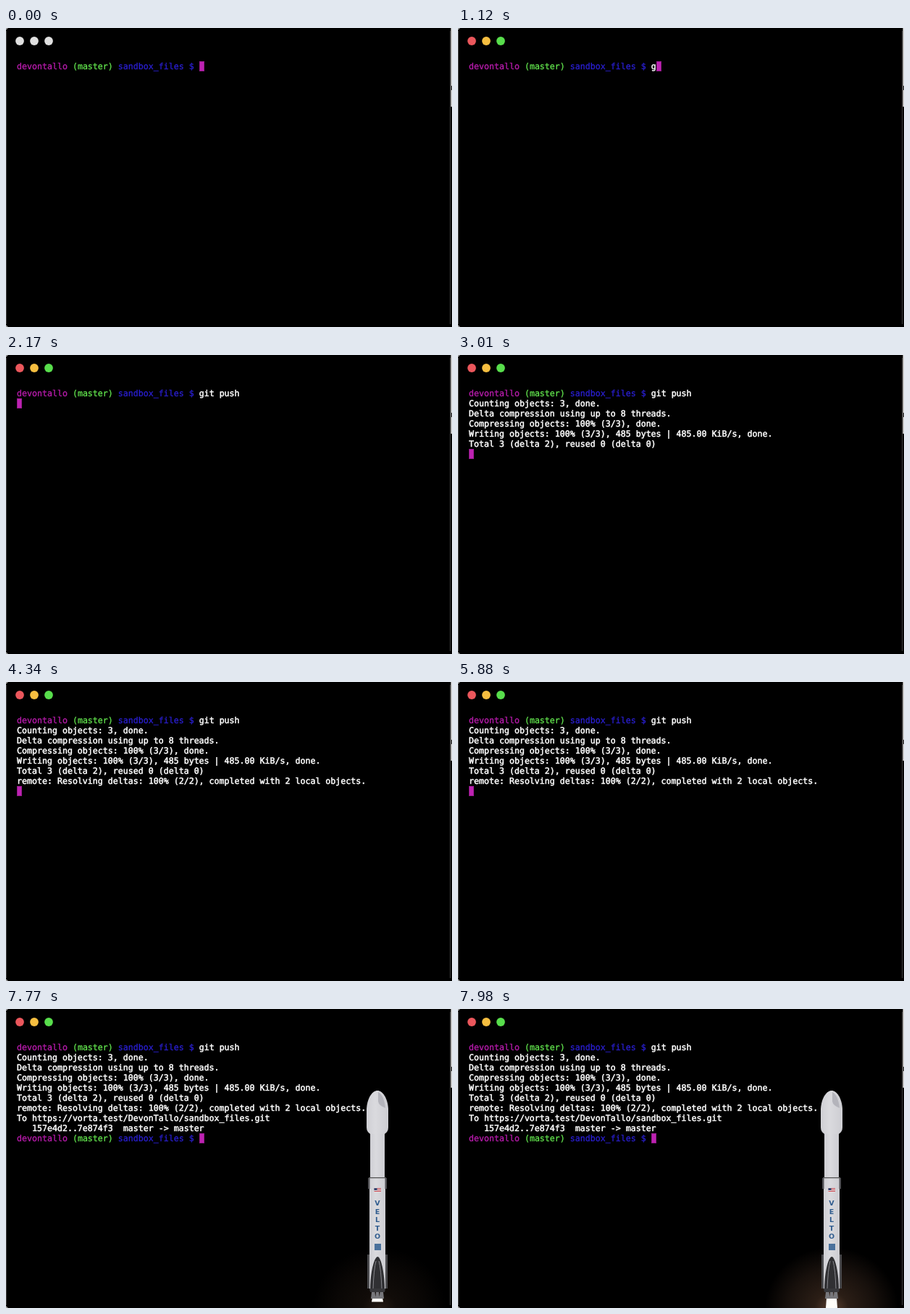
Recreate the animation shown at these times as an HTML page. Size 616 by 414 pixels, loop 8 s.

```html
<!DOCTYPE html>
<html lang="en">
<head>
<meta charset="utf-8">
<title>Terminal push</title>
<style>
  html, body { margin: 0; width: 100%; height: 100%; overflow: hidden; background: #000; }
  svg { display: block; width: 616px; height: 414px; }
  .term text {
    font: 11.627px "DejaVu Sans Mono", monospace;
    white-space: pre;
    text-rendering: geometricPrecision;
    fill: #fff;
    stroke: #fff;
    stroke-width: .5px;
  }
  .term .user { fill: #b51ba9; stroke: #b51ba9; stroke-width: .35px; }
  .term .branch { fill: #5fdd4b; stroke: #5fdd4b; stroke-width: .35px; }
  .term .path { fill: #2a1fd0; stroke: #2a1fd0; stroke-width: .3px; }
  .label text { font: bold 9.5px "DejaVu Sans", sans-serif; text-anchor: middle; fill: #2f5b8e; }
</style>
</head>
<body>
<svg viewBox="0 0 616 414">
  <defs>
    <radialGradient id="glow">
      <stop offset="0" stop-color="#5a4030"/>
      <stop offset=".25" stop-color="#2b1e16"/>
      <stop offset=".65" stop-color="#17100c"/>
      <stop offset="1" stop-color="#000"/>
    </radialGradient>
    <linearGradient id="hull">
      <stop offset="0" stop-color="#cfcfd4"/>
      <stop offset=".4" stop-color="#dadade"/>
      <stop offset="1" stop-color="#cdcdd2"/>
    </linearGradient>
  </defs>

  <rect width="616" height="414"/>
  <path d="M614.500 0h1.500v109h-1.500z" fill="#e4e4e4"/>
  <path d="M615 80h1v6h-1z" fill="#222"/>
  <path d="M0 0h3L0 3zM0 414h3l-3 -3z" fill="#999"/>
  <path d="M.5 4V410M613.500 4V410" stroke="#3c3c3c"/>

  <g id="dots">
    <circle cx="19" cy="18" r="5.900"/>
    <circle cx="39" cy="18" r="5.900"/>
    <circle cx="59" cy="18" r="5.900"/>
  </g>

  <ellipse id="halo" cx="516" cy="414" rx="92" ry="84" fill="url(#glow)"/>
  <g class="term" id="term"></g>
  <rect id="cursor" width="6" height="13" fill="#bd22b2" stroke="#931a8a"/>

  <g id="rocket">
    <path id="flame" fill="#fffdf8"/>
    <path d="M503 172h20v62h-20z" fill="url(#hull)"/>
    <path d="M498 138C499 123 506 113 513 113S527 123 528 138V164Q528 170 523 173H503Q498 170 498 164Z" fill="url(#hull)"/>
    <path d="M514 115Q522 119 524 137Q515 134 514 128Z" fill="#b4b4bb"/>
    <path d="M502 234h22v154h-22z" fill="url(#hull)"/>
    <path d="M501 233h24v1.3h-24z" fill="#555"/>
    <path d="M500 234h2.5v15H500zM523.5 234h2.5v15h-2.5z" fill="#505054"/>

    <path d="M508.500 248h9.500v5.500h-9.500z" fill="#eee"/>
    <path d="M508.500 248.500h9.500M508.500 250.500h9.500M508.500 252.500h9.500" stroke="#c2414b"/>
    <path d="M508.500 248h4v3h-4z" fill="#33446f"/>
    <g class="label" id="label"></g>
    <path d="M509 325h9v9h-9z" fill="#4a719c"/>

    <path d="M499 340h3v47h-3zM524 340h3v47h-3z" fill="#49494c"/>
    <path d="M503 388C503 367 508 344 513 343S523 367 523 388Z" fill="#303033"/>
    <path d="M507 388Q508 360 511 349M519 388Q518 360 515 349" fill="none" stroke="#85858a"/>
    <path d="M502 387h22l-1 5h-20z" fill="#38383b"/>
    <path d="M505 392h4.500l1 9h-6.500zM511 392h4l1 9h-6zM516.500 392h4.500l1 9h-6.500z" fill="#77777b"/>
  </g>
</svg>
<script>
const LOOP = 8000, STEP = 70, LEFT = 15, CELL = 7, ROW = 14;
const user = 'devontallo', repo = 'sandbox_files', host = 'vorta.test', command = 'git push';
const promptLength = user.length + repo.length + 13;
const byId = id => document.getElementById(id);

const prompt = `<tspan class="user">${user}</tspan> <tspan class="branch">(master)</tspan> ` +
  `<tspan class="path">${repo} $</tspan> `;

// [time of appearance, markup] for each terminal row
const rows = [
  [0, prompt + '<tspan id="typed"></tspan>'],
  [2590, 'Counting objects: 3, done.'],
  [2590, 'Delta compression using up to 8 threads.'],
  [2660, 'Compressing objects: 100% (3/3), done.'],
  [2730, 'Writing objects: 100% (3/3), 485 bytes | 485.00 KiB/s, done.'],
  [2800, 'Total 3 (delta 2), reused 0 (delta 0)'],
  [3080, 'remote: Resolving deltas: 100% (2/2), completed with 2 local objects.'],
  [7210, `To https://${host}/DevonTallo/${repo}.git`],
  [7210, '   157e4d2..7e874f3  master -&gt; master'],
  [7350, prompt]
];
const ENTER = 1960, ROCKET = 7210, IGNITION = 7700;

byId('term').innerHTML = rows.map(([, markup], i) =>
  `<text x="${LEFT}" y="${57 + ROW * i}">${markup}</text>`).join('');
byId('label').innerHTML = [...'VELTO'].map((letter, i) =>
  `<text x="513" y="${272 + 11.600 * i}">${letter}</text>`).join('');

const lines = [...byId('term').children];
const dots = [...byId('dots').children];
const lights = [[235, 87, 92], [246, 190, 64], [88, 222, 76]];
const typed = byId('typed'), cursor = byId('cursor'), rocket = byId('rocket');
const halo = byId('halo'), flame = byId('flame');
const show = (el, on) => el.setAttribute('visibility', on ? 'visible' : 'hidden');
const clamp = v => Math.max(0, Math.min(1, v));

function draw(time) {
  const t = Math.floor(time / STEP) * STEP;

  const focus = clamp((t - 420) / 140);
  dots.forEach((dot, i) => {
    const rgb = lights[i].map(c => Math.round(224 + (c - 224) * focus));
    dot.setAttribute('fill', `rgb(${rgb})`);
  });

  const count = t < 1120 ? 0 : Math.min(command.length, 1 + Math.floor((t - 1120) / 100));
  typed.textContent = command.slice(0, count);
  lines.forEach((line, i) => show(line, t >= rows[i][0]));

  const shown = rows.filter(([at]) => t >= at).length;
  const atPrompt = t < ENTER || shown === rows.length;
  const column = atPrompt ? promptLength + (t < ENTER ? count : 0) : 0;
  const row = atPrompt ? shown - 1 : shown;
  cursor.setAttribute('x', LEFT + CELL * column + .5);
  cursor.setAttribute('y', 46.5 + ROW * row);

  const burn = clamp((t - IGNITION + STEP) / 350);
  const shake = burn && (t - IGNITION) / STEP % 2 === 0 ? 3 : 0;
  show(rocket, t >= ROCKET);
  rocket.setAttribute('transform', `translate(${shake} 0)`);
  halo.setAttribute('opacity', burn);
  flame.setAttribute('d', burn ? `M506 400h14l1 ${14 * burn}h-16z` : '');
}

let start;
function tick(now) {
  start ??= now;
  draw((now - start) % LOOP);
  requestAnimationFrame(tick);
}
draw(0);
requestAnimationFrame(tick);
</script>
</body>
</html>
```
